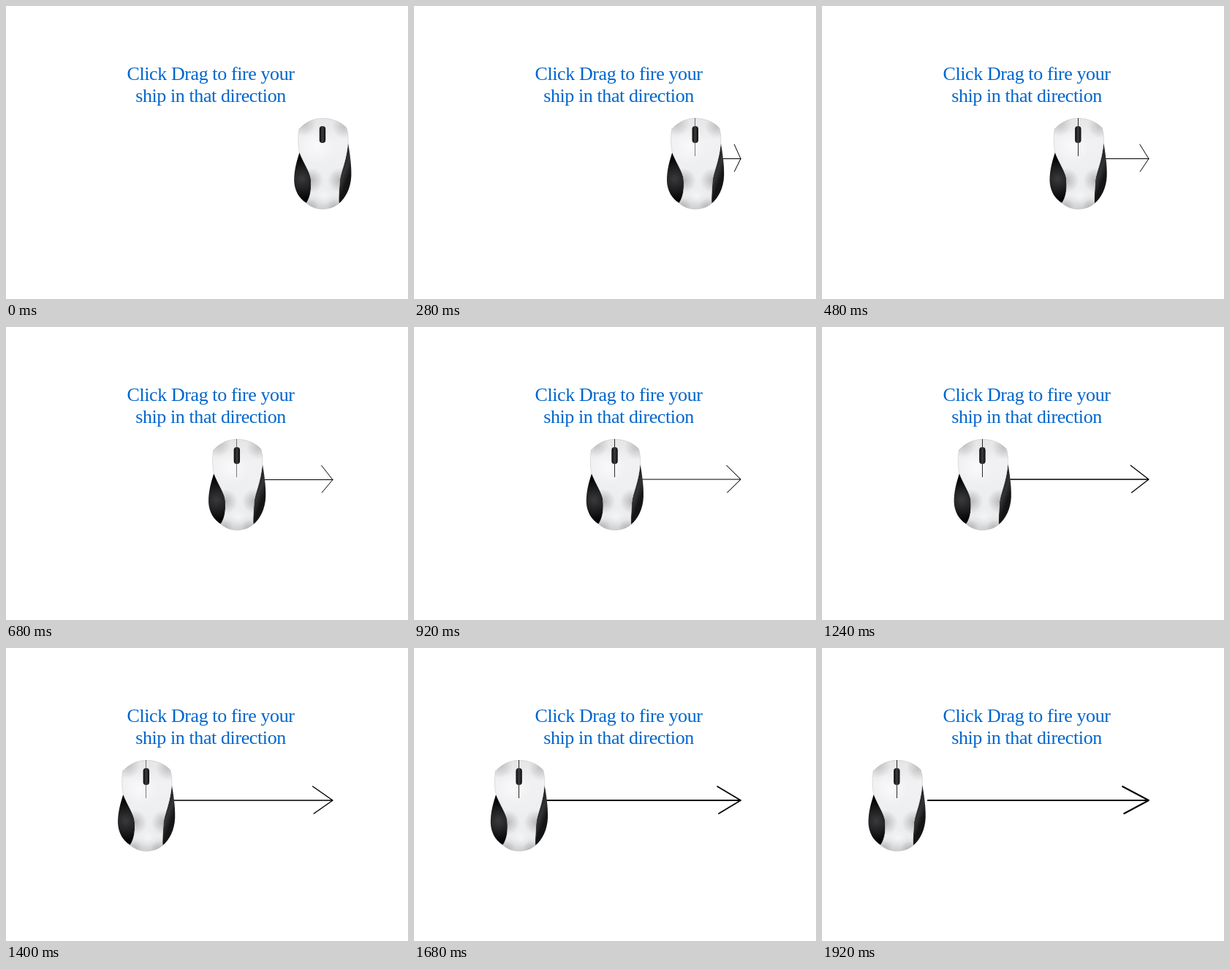
Write an HTML page with a canvas that moves like this. It is 550 px wide and 400 px high and loops after 1960 ms.

```html
<!DOCTYPE html>
<html lang="en">
<head>
<meta charset="utf-8">
<title>Click and drag</title>
<style>
html, body { margin: 0; width: 100%; height: 100%; overflow: hidden; background: #fff; }
canvas { display: block; width: 550px; height: 400px; }
</style>
</head>
<body>
<canvas id="stage" width="550" height="400"></canvas>
<script>
const ctx = document.getElementById('stage').getContext('2d');
const STEP = 40, STEPS = 49;

// Mouse shapes, with x measured from the mouse's centre line
const body = new Path2D(
  'M-32 168 C-23 158 -11 153.3 0 153.3 C13 153.3 25 158 33 166.5 ' +
  'C35 174 35.5 181 35 187 C32.5 214 25 226 23.5 240 C23 252 22 262 22.5 269.5 ' +
  'C16 275 8 277.3 0 277.3 C-8 277.3 -16 274.5 -22 269 ' +
  'C-16 260 -15 248 -16 236 C-16.5 228 -26 214 -31.5 200 C-34 188 -33.5 177 -32 168 Z');
const leftGrip = new Path2D(
  'M-31.5 200 C-35 211 -39 224 -38.8 239 C-38.3 252 -32 263 -22 269 ' +
  'C-16 260 -15 248 -16 236 C-16.5 228 -26 214 -31.5 200 Z');
const rightGrip = new Path2D(
  'M35 187 C37.5 202 39.8 216 39.4 232 C38.8 248 32 262 22.5 269.5 ' +
  'C22 262 23 252 23.5 240 C25 226 32.5 214 35 187 Z');

function gradient(g, stops) {
  stops.forEach(([at, color]) => g.addColorStop(at, color));
  return g;
}
const linear = (x0, y0, x1, y1, ...stops) =>
  gradient(ctx.createLinearGradient(x0, y0, x1, y1), stops);
const radial = (x, y, r, ...stops) =>
  gradient(ctx.createRadialGradient(x, y, 0, x, y, r), stops);

const skin = linear(0, 153, 0, 277,
  [0, '#e4e5e6'], [0.25, '#f1f1f3'], [0.55, '#eeeff1'], [0.85, '#ebecee'], [1, '#cfd0d2']);
const gripLeft = radial(-28, 236, 28, [0, '#3a3a3c'], [0.5, '#202022'], [1, '#040404']);
const gripRight = linear(22, 215, 40, 222, [0, '#161617'], [0.6, '#343436'], [1, '#151516']);
const wheel = linear(-4, 0, 4, 0, [0, '#0c0c0c'], [0.5, '#3c3c3c'], [1, '#0c0c0c']);

// Soft shading on the shell: x, y, radius, grey level, strength
const shades = [
  [-26, 160, 18, 165, 0.6],
  [30, 164, 17, 165, 0.6],
  [-16, 238, 17, 155, 0.65],
  [24, 238, 17, 155, 0.65],
  [-8, 192, 24, 255, 0.6],
  [2, 260, 13, 255, 0.5],
  [-18, 275, 13, 150, 0.6],
  [18, 276, 13, 150, 0.6]
].map(([x, y, r, v, a]) =>
  radial(x, y, r, [0, `rgba(${v},${v},${v},${a})`], [1, `rgba(${v},${v},${v},0)`]));

function fill(path, style) {
  ctx.fillStyle = style;
  ctx.fill(path);
}

function drawText() {
  ctx.font = '26px "Liberation Serif", "Times New Roman", serif';
  ctx.letterSpacing = '-0.4px';
  ctx.textAlign = 'center';
  ctx.fillStyle = '#0066cc';
  ctx.fillText('Click Drag to fire your', 280, 101);
  ctx.fillText('ship in that direction', 280, 131);
}

function drawArrow(n) {
  const width = Math.max(1, 0.1 + 1.9 * n / 48);
  const y = width > 1 ? 208 : 208.5; // hairlines sit on a pixel row
  ctx.strokeStyle = '#000';
  ctx.lineWidth = width;
  ctx.lineCap = 'round';
  ctx.lineJoin = 'round';
  ctx.beginPath();
  ctx.moveTo(441 - 6.17 * n, y);
  ctx.lineTo(447, y);
  ctx.moveTo(442.8 - 0.66 * n, 189);
  ctx.lineTo(447, y);
  ctx.lineTo(442.6 - 0.61 * n, 226);
  ctx.stroke();
}

function drawMouse(x) {
  ctx.save();
  ctx.translate(x, 0);
  fill(leftGrip, gripLeft);
  fill(rightGrip, gripRight);
  fill(body, skin);
  shades.forEach(s => fill(body, s));
  ctx.strokeStyle = 'rgba(150,150,152,0.35)';
  ctx.lineWidth = 0.8;
  ctx.stroke(body);
  ctx.restore();

  // The hairline seam fades with its sub-pixel position
  const px = Math.floor(x), part = x - px;
  const alpha = part < 0.15 ? 0 : part < 0.68 ? 0.9 : 0.55;
  ctx.fillStyle = `rgba(20,20,20,${alpha})`;
  ctx.fillRect(px, 153, 1, 52);

  ctx.save();
  ctx.translate(x, 0);
  ctx.fillStyle = wheel;
  ctx.beginPath();
  ctx.roundRect(-4.2, 164, 8.4, 23, 4);
  ctx.fill();
  ctx.restore();
}

function draw(now) {
  const n = Math.floor((now - start) / STEP) % STEPS;
  ctx.fillStyle = '#fff';
  ctx.fillRect(0, 0, 550, 400);
  drawText();
  drawArrow(n);
  drawMouse(433 - 6.89 * n);
}

const start = performance.now();
function tick() {
  draw(performance.now());
  requestAnimationFrame(tick);
}
tick();
</script>
</body>
</html>
```
